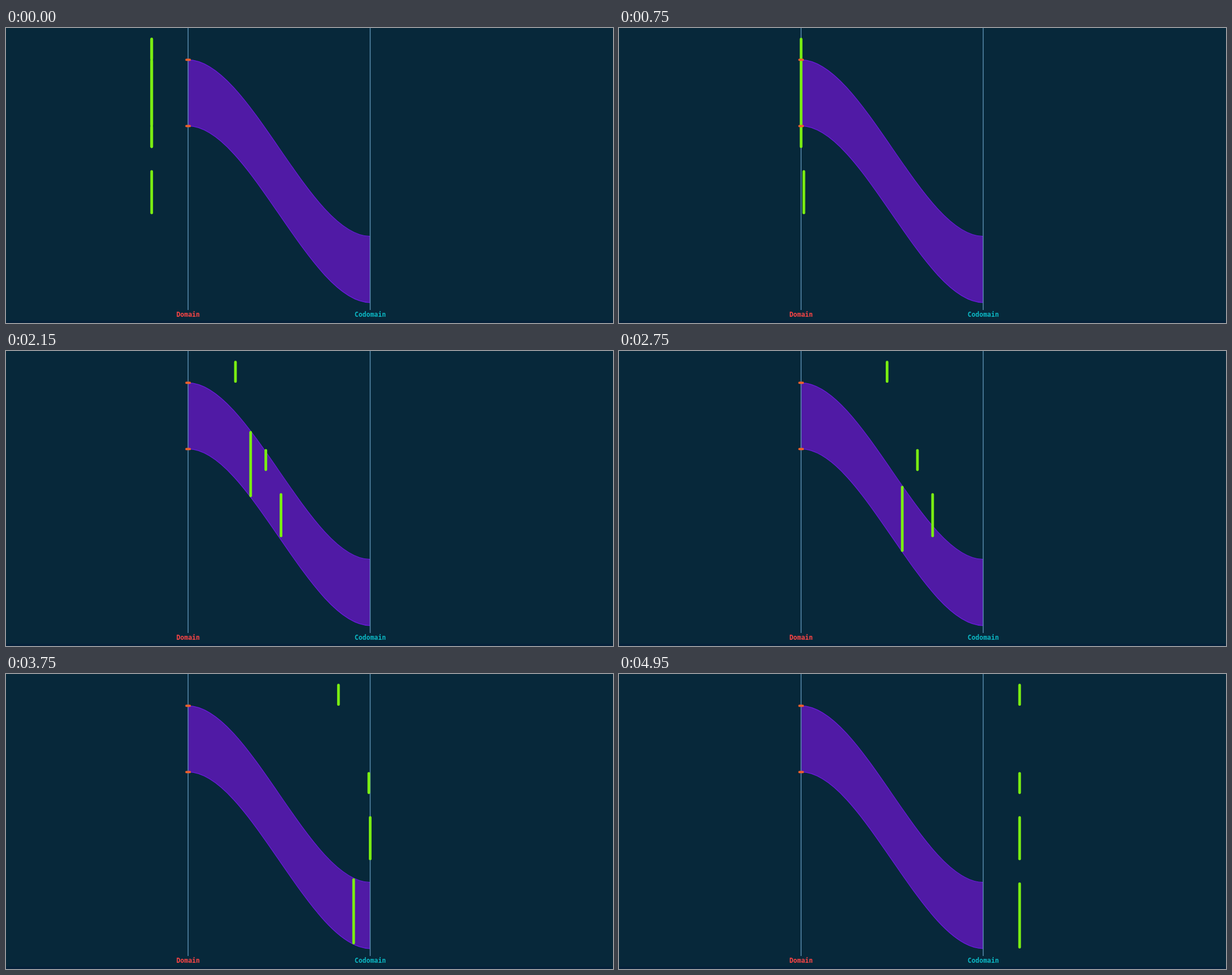
An HTML page for the animation above (5000 ms loop, 1074 px wide and 522 px high).

```html
<!DOCTYPE html>
<html lang="en">
<head>
<meta charset="utf-8">
<title>Domain to Codomain</title>
<style>
  html, body { margin: 0; width: 100%; height: 100%; overflow: hidden; background: #07283a; }
  svg { display: block; width: 100%; height: 100%; }
  text { font: bold 11.5px "DejaVu Sans Mono", "Liberation Mono", monospace; text-anchor: middle; }
</style>
</head>
<body>
<svg viewBox="0 0 1074 522" preserveAspectRatio="none">
  <rect width="1074" height="522" fill="#07283a"/>
  <rect y="518" width="1074" height="4" fill="#05213a"/>
  <path id="band" fill="#501aa5" stroke="#6a1bdc" stroke-width="1.2"/>
  <g stroke="#5a8cae" stroke-width="1.5">
    <path d="M322.2 0V499M644.4 0V499"/>
  </g>
  <g id="bars" fill="#7aee12"></g>
  <path id="marks" stroke="#ee5f2c" stroke-width="4" stroke-linecap="round"/>
  <text x="322.2" y="510.5" fill="#ff4545">Domain</text>
  <text x="644.4" y="510.5" fill="#0cb9c5">Codomain</text>
</svg>
<script>
const LOOP = 5000, STEP = 50, PHASE = (LOOP - STEP) / 7;
const LEFT = 322.2, SPAN = 322.2, EDGE = 64.44;
const TOP = 17.3, UNIT = 39.04, BAR = 4.8, DROP = 8;
const $ = id => document.getElementById(id);
const rowY = v => TOP + v * UNIT;
const clamp = v => Math.min(1, Math.max(0, v));
const smooth = s => s * s * (3 - 2 * s);

// Intervals in row units; the first piece to leave has lag 0.
const pieces = [
  { from: 0, to: 1, lag: 3 },
  { from: 1, to: 4, lag: 2, mapped: true },
  { from: 4, to: 5, lag: 1 },
  { from: 6, to: 8, lag: 0 }
];

function addBar() {
  const bar = document.createElementNS("http://www.w3.org/2000/svg", "rect");
  bar.setAttribute("width", BAR);
  bar.setAttribute("rx", BAR / 2);
  return $("bars").appendChild(bar);
}

function place(bar, x, from, to) {
  bar.setAttribute("x", x - BAR / 2);
  bar.setAttribute("y", rowY(from));
  bar.setAttribute("height", (to - from) * UNIT);
}

const whole = addBar();
for (const p of pieces) p.bar = addBar();

const right = LEFT + SPAN, c1 = LEFT + SPAN / 3, c2 = right - SPAN / 3;
const [a, b, c, d] = [1, 4, 1 + DROP, 4 + DROP].map(rowY);
$("band").setAttribute("d",
  `M${LEFT} ${a}C${c1} ${a} ${c2} ${c} ${right} ${c}V${d}C${c2} ${d} ${c1} ${b} ${LEFT} ${b}Z`);
$("marks").setAttribute("d", `M319.2 ${a}h6M319.2 ${b}h6`);

function draw(ms) {
  const u = Math.floor((ms % LOOP + 1) / STEP) * STEP / PHASE;
  const slide = EDGE * (clamp(u) - 1 + clamp(u - 6));
  for (const p of pieces) {
    const s = clamp((u - 1 - p.lag / 3) / 4);
    const shift = p.mapped ? DROP * smooth(s) : 0;
    place(p.bar, LEFT + slide + SPAN * s, p.from + shift, p.to + shift);
  }
  // Before the split the upper three pieces form one bar.
  whole.style.display = u < 1 ? "" : "none";
  place(whole, LEFT + slide, 0, 5);
}

const start = performance.now();
function tick() {
  draw(performance.now() - start);
  requestAnimationFrame(tick);
}
draw(0);
requestAnimationFrame(tick);
</script>
</body>
</html>
```
